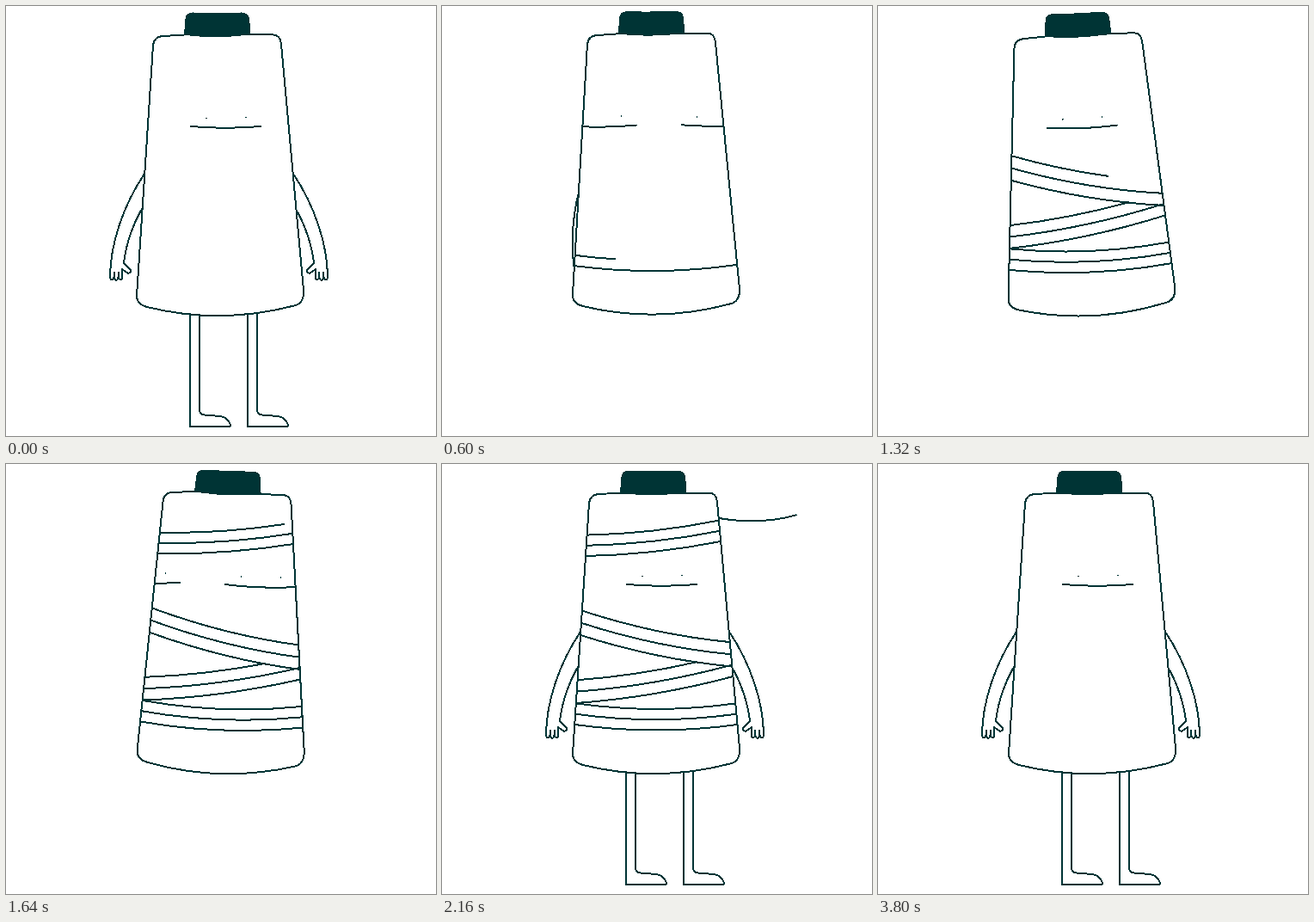
Write an HTML page that moves like this. It is 500x500 px and loops after 3840 ms.

```html
<!DOCTYPE html>
<html lang="en">
<head>
<meta charset="utf-8">
<title>Thread spool</title>
<style>
html, body { margin: 0; width: 100%; height: 100%; overflow: hidden; background: #fff; }
svg { display: block; width: 100vw; height: 100vh; shape-rendering: crispEdges; }
.ink { fill: none; stroke: #003435; stroke-width: 2; stroke-linecap: round; stroke-linejoin: round; }
.white { fill: #fff; }
.solid { fill: #003435; }
.dot { fill: #003435; stroke: none; }
.thread { stroke-linecap: butt; }
</style>
</head>
<body>
<svg viewBox="0 0 500 500" class="ink">
  <defs>
    <path id="shell" d="M171 46Q172 35 184 35L207 33.5H311Q319 34 320 44L346 330Q347 346 335 348.5Q249 371 164 350Q152 347 152 337Z"/>
    <clipPath id="inside"><use href="#shell"/></clipPath>
    <path id="leg" class="white" d="M214 340V489H259Q262 489 260 485Q257 478 249 477L231 475.5Q225 475 225 469V340"/>
    <path id="arm" class="white" d="M161 195C137 231 121 276 121 316Q122 319 124 318Q126 317 126 310V316Q127 320 129 318.500Q131 317 131 310V316Q133 320 135 317V306L142 311Q146 310 145 307L137 299C139 279 147 255 158 236"/>
    <g id="face">
      <path d="M215 140Q255 143.5 296 140"/>
      <circle class="dot" cx="233" cy="130.5" r="1"/>
      <circle class="dot" cx="279" cy="129.5" r="1"/>
    </g>
  </defs>
  <g id="legL"><use href="#leg"/></g>
  <g id="legR"><use href="#leg" x="67"/></g>
  <g id="arms">
    <g id="armL"><use href="#arm"/></g>
    <g transform="translate(495 0) scale(-1 1)"><g id="armR"><use href="#arm"/></g></g>
  </g>
  <g id="body">
    <use href="#shell" class="white"/>
    <path class="solid" d="M208 33L209.5 15Q210 9 217 8.5Q245 9.5 274 8.5Q281 9 282 14L283.5 32.5Q246 37.5 208 33Z"/>
    <g clip-path="url(#inside)">
      <g id="faces"><use href="#face" x="-134"/><use href="#face"/><use href="#face" x="134"/></g>
      <g id="wraps" class="thread"></g>
    </g>
    <path id="tail"/>
  </g>
</svg>
<script>
const LOOP = 3840, STEP = 40, FACE_GAP = 134;
const $ = id => document.getElementById(id);
const clamp = v => Math.max(0, Math.min(1, v));
const smooth = (t, a, b) => {
  const u = clamp((t - a) / (b - a));
  return u * u * (3 - 2 * u);
};
const pulse = (t, mid, width) => Math.exp(-(((t - mid) / width) ** 2));

// Sides of the spool at a given height.
const leftX = y => 171 - (y - 46) * 0.065;
const rightX = y => 320 + (y - 44) * 0.091;

// Four bundles of three parallel threads: lowest left and right heights, spacing, sag.
const bundles = [[303, 303, 12.3, 13], [278, 247, 13.4, 9], [199, 235.5, 14.2, 10], [107, 90, 12.2, 7]];
const wraps = bundles.flatMap(([l, r, gap, sag], b) => [0, 1, 2].map(i => {
  const y1 = l - gap * i, y2 = r - gap * i, x1 = leftX(y1), x2 = rightX(y2);
  const el = document.createElementNS("http://www.w3.org/2000/svg", "path");
  el.setAttribute("d", `M${x1} ${y1}Q${(x1 + x2) / 2} ${(y1 + y2) / 2 + sag} ${x2} ${y2}`);
  $("wraps").append(el);
  // The last thread of the second bundle slips under the crossing one.
  return { el, part: b === 1 && i === 2 ? 0.78 : 1 };
}));

function reveal(path, part) {
  const len = path.getTotalLength();
  path.style.display = part > 0 ? "" : "none";
  path.style.strokeDasharray = part < 1 ? `${len * part} ${len + 9}` : "none";
}

const place = (id, x, y, angle = 0, cx = 0, cy = 0) =>
  $(id).setAttribute("transform", `translate(${x} ${y}) rotate(${angle} ${cx} ${cy})`);

function drawLimbs(t, bob) {
  const lift = -150 * (smooth(t, 40, 400) - smooth(t, 1660, 2000));
  place("legL", lift * 0.065, lift);
  place("legR", lift * 0.026, lift);

  place("arms", 0, bob);
  const tuck = smooth(t, 40, 440) - smooth(t, 1900, 2100);
  const arm = (id, flick) => {
    const h = tuck * (1 - 0.48 * pulse(t, flick, 80));
    place(id, 16 * h * h, 0, -26 * h, 161, 195);
  };
  arm("armL", 620);
  arm("armR", 720);
}

function drawThread(t) {
  const wound = t < 2920 ? Math.min(13, (t - 478) / 97.3) : 13 * (1 - clamp((t - 2920) / 840) ** 2.6);
  wraps.forEach(({ el, part }, i) => reveal(el, part * clamp(wound - i)));

  const angle = 90 * smooth(t, 2600, 3200) - 2 - 10 * pulse(t, 1880, 150);
  const bend = 10 - 27 * pulse(t, 2920, 200);
  $("tail").setAttribute("d", `M0 0Q48 ${bend} 90 0`);
  place("tail", 322, 63, angle);
  reveal($("tail"), clamp(wound - 12));
}

function draw(t) {
  const bob = 3 * pulse(t, 160, 60) - 1.5 * pulse(t, 600, 250) + 8 * pulse(t, 1880, 70);
  const tilt = t > 585 && t < 1745 ? -2.4 * Math.sin(2 * Math.PI * (t - 585) / 580) : 0;
  place("body", 0, bob, tilt, 249, 350);

  const turn = t > 359 && t < 1713 ? 1.485 + (t - 600) / 96.7 : 0;
  place("faces", FACE_GAP * (turn - Math.round(turn)), 0);

  drawLimbs(t, bob);
  drawThread(t);
}

const start = performance.now();
function tick() {
  const t = (performance.now() - start) % LOOP;
  draw(Math.floor(t / STEP) * STEP);
  requestAnimationFrame(tick);
}
tick();
</script>
</body>
</html>
```
